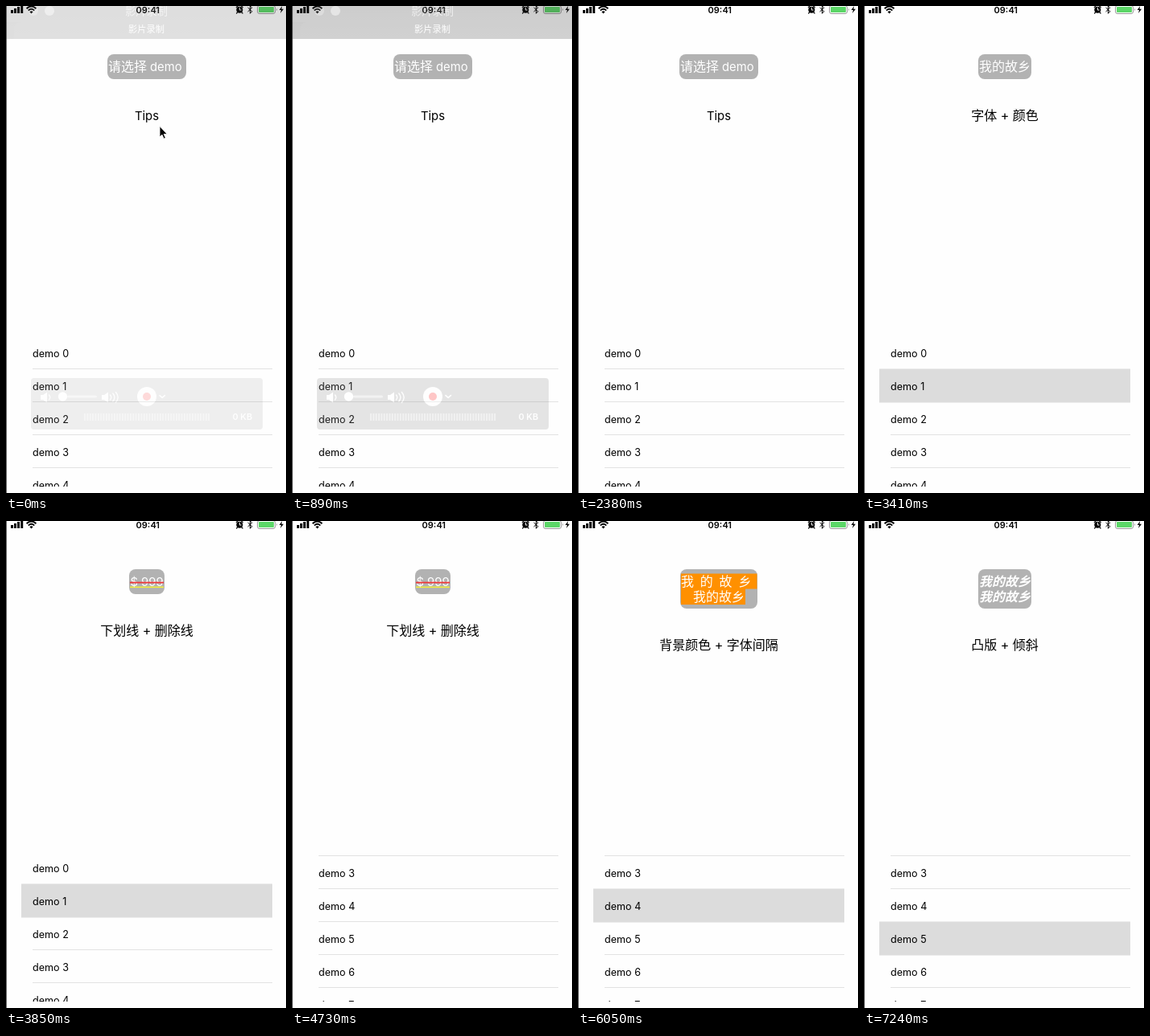
An HTML page that plays this animation: 348x606 px, repeating every 8000 ms.

```html
<!DOCTYPE html>
<html lang="zh-CN">
<head>
<meta charset="utf-8">
<title>demo</title>
<style>
  html, body { margin: 0; width: 100%; height: 100%; overflow: hidden; background: #fff; }
  svg { display: block; width: 348px; height: 606px; }
  text { font-family: Inter, "Noto Sans CJK SC", "Noto Sans CJK JP", sans-serif; white-space: pre; }
  .row { font-size: 12.6px; fill: #000; }
  .cjk { font-size: 16px; }
  .latin { font-size: 14.8px; }
  .mid { text-anchor: middle; }
  .slant { font-style: italic; font-weight: 700; }
  .line { fill: none; stroke-linecap: round; stroke-linejoin: round; }
</style>
</head>
<body>
<svg viewBox="0 0 348 606">
  <defs>
    <clipPath id="listClip"><rect x="19" y="411" width="312" height="187"/></clipPath>
    <linearGradient id="barFill" x2="0" y2="1">
      <stop offset="0" stop-color="#333"/><stop offset="1" stop-color="#444"/>
    </linearGradient>
  </defs>
  <rect width="348" height="606" fill="#fefefe"/>
  <rect width="1" height="606" fill="#666"/>

  <g id="status">
    <path d="M6 5h3v4h-3zM10 3h3v6h-3zM14 1h3v8h-3zM18.2 -1h3v10h-3z"/>
    <g class="line" stroke="#000" stroke-width="1.9" style="stroke-linecap:butt">
      <path d="M25.6 3.2Q31.5 -2.4 37.4 3.2M27.8 5.6Q31.5 2 35.2 5.6"/>
    </g>
    <path d="M29.4 7.2Q31.5 5.4 33.6 7.2L31.5 9.4z"/>
    <text class="mid" x="176.3" y="8.6" font-size="11" font-weight="600">09:41</text>
    <circle cx="290.3" cy="4.7" r="4"/>
    <path class="line" d="M290.3 2.2V5H292.2" stroke="#fff"/>
    <path class="line" d="M286.3 1.6L288 0M294.3 1.6L292.6 0M287.4 8.2L286.6 9M293.2 8.2L294 9" stroke="#000" stroke-width="1.2"/>
    <path class="line" d="M300.8 2.2L305.8 6.8L303.4 9.3V-.2L305.8 2.2L300.8 6.8" stroke="#000"/>
    <rect x="312.5" y="-.5" width="22" height="10" rx="2.5" fill="#fff" stroke="#999"/>
    <rect x="314" y="1" width="19" height="7" rx="1" fill="#5bd667"/>
    <path d="M336 3q2 1.5 0 3z" fill="#999"/>
    <path d="M343.2 0L339.6 5H342L341 9L345 3.8H342.4z"/>
  </g>

  <g id="head"></g>
  <g clip-path="url(#listClip)"><g id="list"></g></g>

  <g id="panel">
    <rect width="348" height="41" fill="url(#barFill)" fill-opacity=".6"/>
    <path d="M10 41V32Q10 20 20 20H0V41z" fill="#000" fill-opacity=".04"/>
    <g fill="#fff">
      <circle cx="34" cy="6" r="6" opacity=".3"/>
      <circle cx="54" cy="6" r="6" opacity=".5"/>
      <text class="mid" x="174.5" y="10.6" font-size="13.2" opacity=".65">影片录制</text>
      <text class="mid" x="174.5" y="33" font-size="11.2">影片录制</text>
    </g>
    <rect x="31" y="463" width="288" height="64" rx="4" fill="#8f8f8f" fill-opacity=".57"/>
    <g fill="#fff">
      <path id="horn" d="M43 484H46L51 480.5V493.5L46 490H43z"/>
      <use href="#horn" x="76"/>
      <rect x="76" y="484.5" width="37" height="3" rx="1.5" opacity=".55"/>
      <circle cx="70.5" cy="486" r="5.7"/>
      <circle cx="175" cy="486" r="12"/>
      <text x="281.5" y="515" font-size="10.8" font-weight="600">0 KB</text>
    </g>
    <g class="line" stroke="#fff" stroke-width="1.3">
      <path d="M53.5 484Q56 487 53.5 490M129.5 484Q132 487 129.5 490M132.8 482Q137 487 132.8 492M136.4 480.5Q142 487 136.4 493.5"/>
      <path d="M191 484.6L194.2 487.4L197.4 484.6" stroke-width="1.6"/>
    </g>
    <path d="M97 511.5H253" fill="none" stroke="#fff" stroke-width="9" stroke-dasharray="2 1.35" opacity=".5"/>
    <circle cx="175" cy="486" r="5" fill="#ff7474"/>
  </g>

  <path id="cursor" d="M191 149.5V163L194 160.3L196.2 165.2L198.4 164.2L196.2 159.4H200.3z" stroke="#fff" stroke-width=".9"/>
</svg>

<script>
const LOOP = 8000, ROW = 41, TOP = 411;
const $ = id => document.getElementById(id);

const rect = (x, y, w, h, fill, r = 0) =>
  `<rect x="${x}" y="${y}" width="${w}" height="${h}" rx="${r}" fill="${fill}"/>`;
const text = (x, y, s, cls = "cjk", fill = "#fff", extra = "") =>
  `<text x="${x}" y="${y}" class="${cls}" fill="${fill}" ${extra}>${s}</text>`;
const badge = (x, w, h) => rect(x, 60, w, h, "#b2b2b2", 8);
const title = (y, s, cls = "cjk") => text(175, y, s, cls + " mid", "#000");

const home = "我的故乡";
const twoLines = cls => badge(142, 66, 49) + text(143, 81, home, cls) + text(143, 99.5, home, cls);

const heads = {
  start: badge(126, 98, 31) + text(127, 81, "请选择") + text(179, 81, "demo", "latin") +
    title(142, "Tips", "latin"),
  font: badge(142, 66, 31) + text(143, 81, home) + title(142, "字体 + 颜色"),
  lines: badge(153, 44, 31) + rect(154, 81.5, 42, 1.6, "#f4ee3a") +
    text(175, 81, "$ 999", "latin mid") + rect(154, 75.7, 42, 1.8, "#f03838") +
    title(141.5, "下划线 + 删除线"),
  back: badge(127, 96, 49) + rect(128, 65.5, 94.5, 19, "#ff9000") + rect(128, 84, 80, 20, "#ff9000") +
    text(128, 81, home, "cjk", "#fff", 'letter-spacing="7.8"') + text(143, 99.5, home) +
    title(160, "背景颜色 + 字体间隔"),
  stroke: twoLines("cjk") + title(160, "描边 + 阴影"),
  press: twoLines("cjk slant") + title(160, "凸版 + 倾斜")
};

// [time, value] steps, each held until the next
const tracks = {
  head: [[0, "start"], [2670, "font"], [3560, "lines"], [5620, "back"], [6200, "stroke"], [7240, "press"]],
  row: [[0, -1], [2520, 0], [3410, 1], [4730, -1], [5470, 3], [6050, 4], [7090, 5]],
  scroll: [[0, 0], [4300, 22], [4450, 76], [4590, 108], [4730, 117]],
  panel: [[0, .26], [150, 0], [890, .4], [1040, .9], [1190, 1], [1340, .7], [1490, 0]],
  cursor: [[0, 1], [150, 0]]
};

const at = (track, t) => track.reduce((v, [time, next]) => t >= time ? next : v, track[0][1]);

let rows = "";
for (let i = 0; i < 9; i++) {
  const y = TOP + i * ROW;
  rows += rect(33, y + 40, 298, 1, "#e2e2e2") + text(33, y + 25.5, "demo " + i, "row", "#000");
}
$("list").innerHTML = rows;
const mark = document.createElementNS("http://www.w3.org/2000/svg", "rect");
for (const [k, v] of Object.entries({ x: 19, width: 312, height: ROW + 1, fill: "#dcdcdc" })) mark.setAttribute(k, v);
$("list").prepend(mark);
// The mark also hides the separators beside it
const seps = [...$("list").querySelectorAll("rect")].slice(1);

let shown = "";
function draw(t) {
  const head = at(tracks.head, t), row = at(tracks.row, t);
  if (head !== shown) $("head").innerHTML = heads[shown = head];
  mark.setAttribute("y", TOP + row * ROW - .5);
  mark.style.display = row < 0 ? "none" : "";
  seps.forEach((s, i) => s.style.display = row >= 0 && (i === row || i === row - 1) ? "none" : "");
  $("list").setAttribute("transform", `translate(0 ${-at(tracks.scroll, t)})`);
  $("panel").style.opacity = at(tracks.panel, t);
  $("cursor").style.opacity = at(tracks.cursor, t);
}

const begin = performance.now();
function tick() {
  draw((performance.now() - begin) % LOOP);
  requestAnimationFrame(tick);
}
tick();
</script>
</body>
</html>
```
